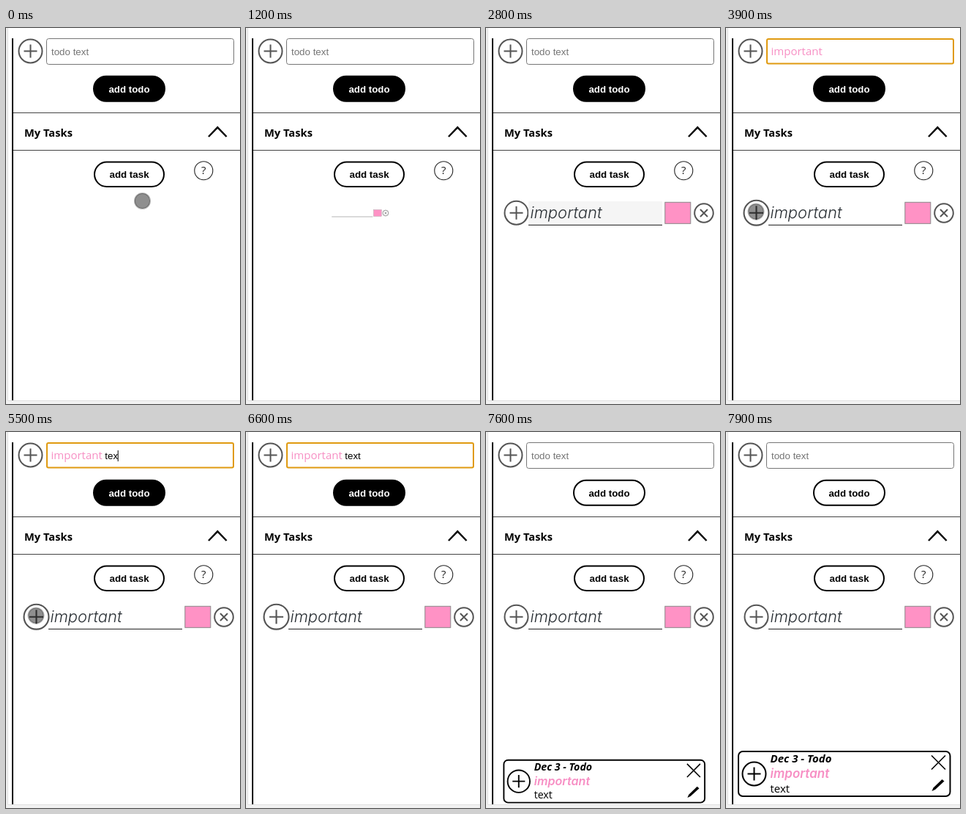
An HTML page that plays this animation: 320 px wide and 512 px high, repeating every 8 s.

```html
<!DOCTYPE html>
<html lang="en">
<head>
<meta charset="utf-8">
<title>Todo panel</title>
<style>
html, body { margin: 0; height: 100%; overflow: hidden; background: #fff; }
svg { display: block; }
text { font: 13.33px "Liberation Sans", Arial, sans-serif; }
.bold { font-weight: 700; text-anchor: middle; }
.ui { font-family: "Open Sans", "Noto Sans", sans-serif; font-size: 15px; }
.task { font: italic 300 22px Inter, sans-serif; fill: #2b3136; }
.line { fill: none; stroke: #555; stroke-width: 2; }
.pill { stroke: #000; stroke-width: 2; }
.tap { fill: rgba(40, 160, 225, .4); }
</style>
</head>
<body>
<svg width="320" height="512" viewBox="0 0 320 512">
  <defs>
    <g id="plus"><circle r="16"/><path d="M-9 0H9M0-9V9"/></g>
    <clipPath id="page"><path d="M0 0H320V507H0z"/></clipPath>
  </defs>
  <path d="M0 0H2V507H320V512H0z" fill="#f2f2f2"/>
  <path d="M2.5 0V507.5H320" fill="none" stroke="#e0e0e0"/>
  <path d="M9 14V507" stroke="#000" stroke-width="2"/>

  <use href="#plus" class="line" x="33.5" y="31.5"/>
  <rect id="field" fill="#fff"/>
  <text id="hint" x="62" y="37" fill="#757575">todo text</text>
  <g id="entry">
    <text class="ui" x="61.5" y="37" fill="#f78fc4">important</text>
    <text id="typed" x="135.3" y="37"></text>
  </g>
  <path id="caret" stroke="#000"/>

  <g id="todoBtn">
    <rect id="todoPill" class="pill" x="-48.5" y="-17" width="97" height="34" rx="17"/>
    <text id="todoText" class="bold" y="5">add todo</text>
    <path class="tap" d="M-49.5-18H49.5V18H-49.5z"/>
  </g>

  <path d="M10 115.5H320M10 166.5H320" stroke="#444" stroke-width="1.2"/>
  <text class="ui" x="25" y="148" style="font-size:14.7px;font-weight:700">My Tasks</text>
  <path d="M277 148L289.3 135.3L301.6 148" fill="none" stroke="#000" stroke-width="2.4"/>

  <g id="taskBtn">
    <rect class="pill" x="-47.5" y="-16.7" width="95" height="33.4" rx="16.7" fill="#fff"/>
    <text class="bold" y="4.5">add task</text>
    <path class="tap" d="M-49-18H49V18H-49z"/>
  </g>
  <circle cx="270.3" cy="194.3" r="12.5" fill="none" stroke="#222" stroke-width="1.1"/>
  <text class="ui" x="270.3" y="199.3" text-anchor="middle" fill="#222">?</text>

  <g id="item">
    <g id="insert">
      <use href="#plus" class="line"/>
      <path class="tap" d="M-17-17H17V17H-17z"/>
    </g>
    <path id="focus" d="M58 236H241V268H58z" fill="#f5f5f5"/>
    <path d="M58 268.3H241" stroke="#444" stroke-width="1.3"/>
    <text id="name" class="task" x="60.5" y="259">important</text>
    <rect x="244.8" y="237.3" width="35" height="29" fill="#ff92c5" stroke="#888"/>
    <circle class="line" cx="298" cy="252" r="12.8"/>
    <path class="line" d="M293 247L303 257M303 247L293 257"/>
  </g>
  <path id="nameCaret" d="M161.8 241V264" stroke="#000"/>

  <g clip-path="url(#page)"><g id="card">
    <rect class="pill" x="17" y="435" width="289.5" height="61" rx="6" fill="#fff"/>
    <use href="#plus" x="38.5" y="465.5" class="line" style="stroke:#000"/>
    <text class="ui" x="60.5" y="450" style="font-weight:700;font-style:italic">Dec 3 - Todo</text>
    <text class="task" x="60.5" y="471" style="font-size:17px;font-weight:600;fill:#f78fc4">important</text>
    <text class="ui" x="60.5" y="490.5" font-style="italic">text</text>
    <path d="M281 440.5L300 459.5M300 440.5L281 459.5" stroke="#000" stroke-width="1.6"/>
    <path d="M281.5 489L283.5 484.5L295.5 473L298.5 475.5L286 487z"/>
  </g></g>

  <circle id="dot" r="10.6" fill="rgba(0,0,0,.44)" stroke="rgba(0,0,0,.24)" stroke-width="2"/>
</svg>
<script>
const $ = id => document.getElementById(id);
const set = (id, attrs) => { for (const k in attrs) $(id).setAttribute(k, attrs[k]); };
const show = (id, on) => { $(id).style.display = on ? '' : 'none'; };
const ramp = (t, a, b) => Math.min(1, Math.max(0, (t - a) / (b - a)));
const ease = p => 1 - (1 - p) ** 3;
const within = (t, a, b) => t >= a && t < b;

// start, end, x, y of each touch
const touches = [
  [0, 300, 186.5, 235.5], [800, 1100, 177, 200.5], [1300, 1700, 177, 200.5],
  [2000, 2300, 162.5, 254.5], [3000, 6000, 41, 250], [6900, 7400, 165, 81]
];
const keyTimes = [4400, 4900, 5500, 6000];
const caretX = [132.5, 139.5, 146.5, 153.2, 157];

function place(id, x, y, scale, tapped) {
  set(id, { transform: `translate(${x} ${y}) scale(${scale})` });
  $(id).querySelector('.tap').style.display = tapped ? '' : 'none';
}

function zoom(id, x, y, s, dx = 0, dy = 0) {
  set(id, { transform: `translate(${x + dx} ${y + dy}) scale(${s}) translate(${-x} ${-y})` });
}

function draw(t) {
  const touch = touches.find(d => within(t, d[0], d[1]));
  show('dot', touch);
  if (touch) set('dot', { cx: touch[2], cy: touch[3] });

  const active = within(t, 3400, 7100);
  set('field', active
    ? { x: 56, y: 15, width: 255, height: 33.5, rx: 2, stroke: '#e09a10', 'stroke-width': 2 }
    : { x: 55.5, y: 14.5, width: 256, height: 35, rx: 3, stroke: '#767676', 'stroke-width': 1 });
  show('hint', !active);
  show('entry', active);
  const count = keyTimes.filter(k => t >= k).length;
  $('typed').textContent = 'text'.slice(0, count);
  set('caret', { d: `M${caretX[count]} 25V40` });
  show('caret', within(t, 3400, 3900) || within(t, 4400, 6600));

  const press = (a, b) => 1 - .1 * ramp(t, a, a + 100) * (1 - ramp(t, b, b + 100));
  const white = ramp(t, 6900, 7100), grey = Math.round(255 * white);
  place('todoBtn', 168.5, 82.7, press(7050, 7300), within(t, 7100, 7300));
  set('todoPill', { fill: `rgb(${grey},${grey},${grey})` });
  set('todoText', { fill: white < .5 ? '#fff' : '#000' });
  place('taskBtn', 168.5, 199.3, press(1000, 1100), within(t, 1100, 1200));

  // An empty task has no insert button, so its row sits further left.
  const named = t >= 2300;
  show('item', t > 1200);
  zoom('item', 168, 252, .3 + .7 * ease(ramp(t, 1200, 1500)), named ? 0 : -17);
  show('name', named);
  show('focus', within(t, 2300, 3000));
  show('nameCaret', within(t, 2400, 2800));
  show('insert', named);
  const grow = ramp(t, 3000, 3200) * (1 - ramp(t, 7000, 7150));
  place('insert', 41.5, 251.7, 1 + .06 * grow, within(t, 3300, 3400));

  const rise = ease(ramp(t, 7400, 7850));
  show('card', t > 7400);
  zoom('card', 162, 465, .7 + .3 * rise, 0, 60 * (1 - rise));
  $('card').style.opacity = ramp(t, 7400, 7600);
}

function tick() {
  draw(performance.now() % 8000);
  requestAnimationFrame(tick);
}
tick();
</script>
</body>
</html>
```
